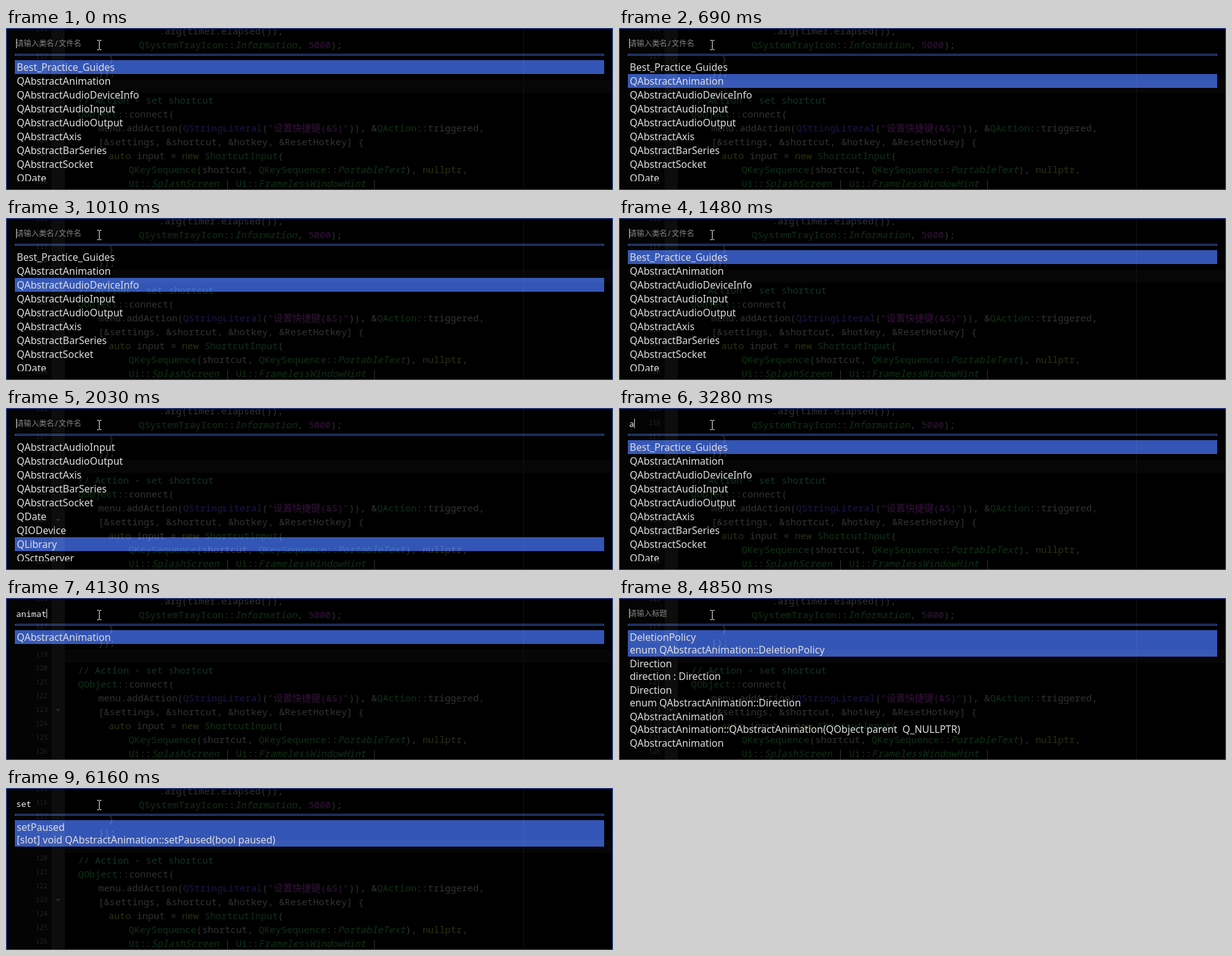
An HTML page for the animation above (6.31 s loop, 960 px wide and 257 px high).

```html
<!DOCTYPE html>
<html lang="zh">
<head>
<meta charset="utf-8">
<title>Class search</title>
<style>
  html, body { margin: 0; width: 100%; height: 100%; overflow: hidden; background: #000; }
  svg { display: block; width: 960px; height: 257px; }
  text { white-space: pre; }
  rect, path { shape-rendering: crispEdges; }
  #list { font: 15.65px "Noto Sans", "Open Sans", sans-serif; fill: #dedede; }
  #hint { font: 12px "Noto Sans Mono", "Noto Sans CJK SC", "Noto Sans CJK", monospace; fill: #808080; }
  #typed { font: 13.33px "Noto Sans Mono", "DejaVu Sans Mono", monospace; fill: #f0f0f0; }
  #back { mix-blend-mode: screen; }
  #code { font: 14.9px "Noto Sans Mono", "Noto Sans CJK SC", "Noto Sans CJK", monospace; fill: #323232; }
  #nums { font: 10.5px "Noto Sans Mono", "DejaVu Sans Mono", monospace; fill: #222; }
  .type { fill: #0f3115; }
  .enum { fill: #0f3115; font-style: italic; }
  .macro { fill: #1c1646; }
  .str { fill: #36123c; }
  .num { fill: #33123a; }
  .key { fill: #2c3012; }
  .note { fill: #12332c; }
</style>
</head>
<body>
<svg viewBox="0 0 960 257">
  <defs><clipPath id="view"><rect x="14" y="51" width="932" height="192"/></clipPath></defs>
  <rect width="960" height="257" fill="#000"/>
  <text id="hint" x="16" y="29"></text>
  <text id="typed" x="16" y="30"></text>
  <rect id="caret" y="17" width="1" height="15" fill="#d8d8d8"/>
  <rect x="14.5" y="41.5" width="931" height="2" fill="none" stroke="#3254b2"/>
  <rect id="bar" x="14" y="51" width="932" height="22" fill="#3355b5"/>
  <g id="list" clip-path="url(#view)"></g>
  <g id="back">
    <rect width="72" height="257" fill="#040404"/>
    <rect x="72" width="21" height="257" fill="#0d0d0d"/>
    <rect x="93" y="82" width="867" height="21" fill="#060606"/>
    <rect x="818" width="1" height="257" fill="#111"/>
    <path d="M78 176h8l-4 4z" fill="#2a2a2a"/>
    <g id="nums"></g>
    <g id="code"></g>
  </g>
  <path d="M144 19.5h3M148 19.5h3M147.5 20v14M144 34.5h3M148 34.5h3" fill="none" stroke="#e8e8e8"/>
  <rect x=".5" y=".5" width="959" height="256" fill="none" stroke="#3457b6"/>
</svg>
<script>
const LOOP = 6310;
const $ = id => document.getElementById(id);

function add(parent, name, attrs, content) {
  const el = document.createElementNS("http://www.w3.org/2000/svg", name);
  for (const k in attrs) el.setAttribute(k, attrs[k]);
  if (content) el.textContent = content;
  parent.appendChild(el);
  return el;
}

// Code lines: x, row, then parts; "kind|text" colours a part.
const code = [
  [242, 0, ".arg(timer.elapsed()),"],
  [210, 1, "type|QSystemTrayIcon", "::", "enum|Information", ", ", "num|5000", ");"],
  [162, 2, "}"],
  [146, 3, "});"],
  [114, 5, "note|// Action - set shortcut"],
  [114, 6, "type|QObject", "::connect("],
  [146, 7, "menu.addAction(", "macro|QStringLiteral", "(", "str|\"设置快捷键(&S)\"", ")), &",
    "type|QAction", "::triggered,"],
  [146, 8, "[&settings, &shortcut, &hotkey, &ResetHotkey] {"],
  [162, 9, "key|auto", " input = ", "key|new", " ", "type|ShortcutInput", "("],
  [194, 10, "type|QKeySequence", "(shortcut, ", "type|QKeySequence", "::", "enum|PortableText", "), ",
    "key|nullptr", ","],
  [194, 11, "type|Ui", "::", "enum|SplashScreen", " | ", "type|Ui", "::", "enum|FramelessWindowHint", " |"]
];
for (const [x, row, ...parts] of code) {
  const line = add($("code"), "text", { x, y: 10 + 22 * row });
  for (const part of parts) {
    const m = part.match(/^([a-z]+)\|(.*)$/);
    add(line, "tspan", m ? { class: m[1] } : {}, m ? m[2] : part);
  }
}
for (let i = 0; i < 12; i++) add($("nums"), "text", { x: 47, y: 5 + 22 * i }, String(115 + i));

const A = "QAbstractAnimation";
const classes = ["Best_Practice_Guides", A, "QAbstractAudioDeviceInfo", "QAbstractAudioInput",
  "QAbstractAudioOutput", "QAbstractAxis", "QAbstractBarSeries", "QAbstractSocket",
  "QDate", "QIODevice", "QLibrary", "QSctpServer"];
const anList = [A, "QStandardItem", "Styles_and_Layout_in_Widget_Applications"];

const ctor = [A, `${A}::${A}(QObject parent  Q_NULLPTR)`];
const dtor = [A, `${A}::~${A}()`];
const pause = ["pause", `[slot] void ${A}::pause()`];
const setPaused = ["setPaused", `[slot] void ${A}::setPaused(bool paused)`];
const members = [
  ["DeletionPolicy", `enum ${A}::DeletionPolicy`],
  ["Direction", "direction : Direction"],
  ["Direction", `enum ${A}::Direction`],
  ctor, dtor
];
const sList = [ctor, dtor, ["State", `enum ${A}::State`], pause, setPaused];

// [start, value] steps
const picks = [[0, 0], [690, 1], [1010, 2], [1330, 1], [1480, 0], [1800, 5], [2030, 10], [2410, 5], [2580, 0]];
const tops = [[0, 0], [2030, 3], [2580, 0]];
const lists = [[0, classes], [3430, anList], [3580, [A]], [4850, members],
  [5230, sList], [5400, [pause, setPaused]], [5550, [setPaused]]];
const keys = [[0, ""], [3280, "a"], [3430, "an"], [3580, "ani"], [3750, "anim"], [3900, "anima"],
  [4130, "animat"], [4300, "animati"], [4850, ""], [5230, "s"], [5400, "se"], [5550, "set"]];

const at = (steps, t) => steps.reduce((v, s) => t >= s[0] ? s[1] : v, steps[0][1]);

let shown = "";
function fillList(items, top, height) {
  const list = $("list");
  list.textContent = "";
  items.slice(top, top + 9).forEach((item, i) => {
    [].concat(item).forEach((s, j) => add(list, "text", { x: 17, y: 68 + height * i + 20 * j }, s));
  });
}

function draw(t) {
  const items = at(lists, t), top = at(tops, t), word = at(keys, t);
  const inMembers = t >= 4850;
  const height = inMembers ? 42 : 22;
  const state = lists.findIndex(s => s[1] === items) + ":" + top;
  if (state !== shown) {
    fillList(items, top, height);
    shown = state;
  }
  $("bar").setAttribute("y", 51 + height * (at(picks, t) - top));
  $("bar").setAttribute("height", height);
  $("hint").textContent = word ? "" : inMembers ? "请输入标题" : "请输入类名/文件名";
  $("typed").textContent = word;
  $("caret").setAttribute("x", 16 + 8 * word.length);
  const off = (t >= 80 && t < 530) || t >= 6160;
  $("caret").setAttribute("visibility", off ? "hidden" : "visible");
}

const start = performance.now();
function tick() {
  draw((performance.now() - start) % LOOP);
  requestAnimationFrame(tick);
}
draw(0);
requestAnimationFrame(tick);
</script>
</body>
</html>
```
